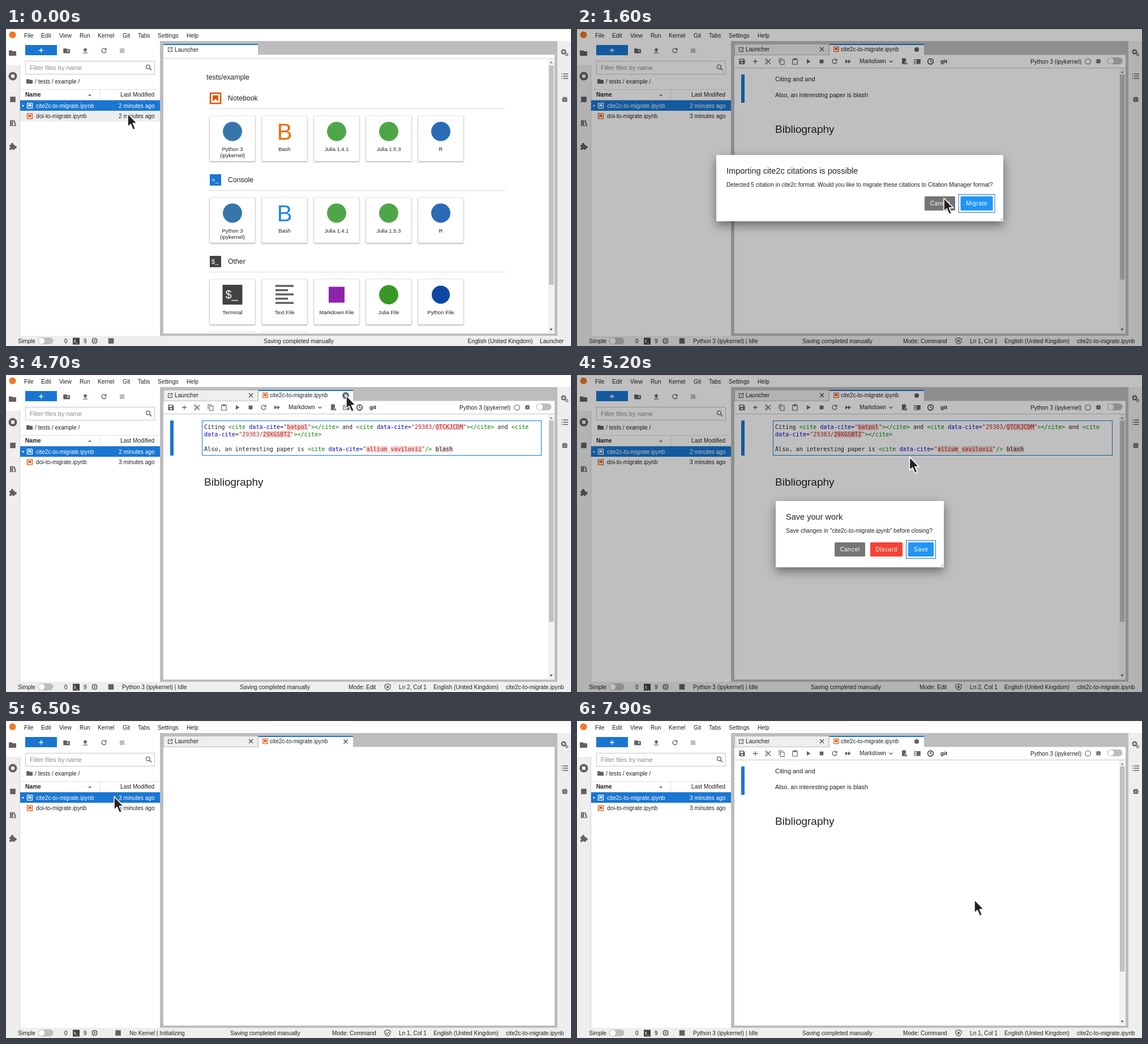
Write an HTML page that moves like this. It is 998 px wide and 561 px high and loops after 8 s.

```html
<!DOCTYPE html>
<html lang="en">
<head>
<meta charset="utf-8">
<title>Citation import</title>
<style>
html, body { margin: 0; width: 100%; height: 100%; overflow: hidden; background: #fff; }
svg { display: block; width: 998px; height: 561px; }
text { font-family: "Liberation Sans", Arial, sans-serif; white-space: pre; }
.code { font-family: "DejaVu Sans Mono", monospace; }
.tip { font-family: "Noto Sans", "Open Sans", sans-serif; }
.card { filter: drop-shadow(0 1px 1px rgba(0,0,0,.38)); }
.dialog { filter: drop-shadow(0 7px 9px rgba(0,0,0,.45)); }
</style>
</head>
<body>
<svg id="stage" viewBox="0 0 998 561"></svg>
<script>
const BLUE = '#1976d2', GREY = '#616161', INK = '#212121', ORANGE = '#e65100';

const text = (x, y, s, size = 10.15, fill = INK, more = '') =>
  `<text x="${x}" y="${y}" font-size="${size}" fill="${fill}" ${more}>${s}</text>`;
const rect = (x, y, w, h, fill, more = '') =>
  `<rect x="${x}" y="${y}" width="${w}" height="${h}" fill="${fill}" ${more}/>`;
const disc = (x, y, r, fill, more = '') =>
  `<circle cx="${x}" cy="${y}" r="${r}" fill="${fill}" ${more}/>`;
const shape = (d, fill = GREY) => `<path d="${d}" fill="${fill}"/>`;
const line = (d, color = GREY, w = 1.3) =>
  `<path d="${d}" fill="none" stroke="${color}" stroke-width="${w}"/>`;
const at = (x, y, body, scale = 1) =>
  `<g transform="translate(${x} ${y}) scale(${scale})">${body}</g>`;
const group = (id, body) => `<g id="${id}">${body}</g>`;

// Icons are drawn around their own centre.
const folder = shape('M-6-4.5h4.5l1.5 1.5h5q1 0 1 1v6q0 1-1 1h-11q-1 0-1-1v-7.5q0-1 1-1z');
const bookmark = (c, s) => rect(-s, -s, 2 * s, 2 * s, 'none', `stroke="${c}" stroke-width="${s * .28}"`) +
  shape(`M${-s * .55} ${-s * .58}h${s * 1.1}v${s * 1.2}l${-s * .55} ${-s * .5}l${-s * .55} ${s * .5}z`, c);
const prompt = (s, fill, mark = '$_') => rect(-s, -s, 2 * s, 2 * s, fill) +
  text(-s * .72, s * .38, mark, s * 1.15, '#fff');
const cross = line('M-3.5-3.5l7 7m0-7l-7 7', '#424242', 1.1);
const reload = line('M3.2-2.7a4 4 0 1 0 .8 3.3') + shape('M4.5-5v4.2h-4.2z');
const plus = c => line('M-4 0h8m-4-4v8', c);
const popout = line('M0-3.5h-3.5v7h7v-3.5M-.5.5l4-4M1-3.7h2.7v2.7', '#424242', 1);
const bug = disc(0, 0, 4, GREY) + line('M-5-3h10M-5.3 0h10.6M-5 3h10M-2.5-5.5l1.5 2m3.5-2l-1.5 2', GREY, 1.2) +
  line('M-1.5-.9h3m-3 2h3', '#eee', .9);
const gear = disc(0, 0, 3, 'none', `stroke="${GREY}" stroke-width="1.8"`) +
  disc(0, 0, 4.3, 'none', `stroke="${GREY}" stroke-width="1.2" stroke-dasharray="1.7 1.67"`);
const chip = rect(-3.5, -3.5, 7, 7, 'none', `stroke="${GREY}" stroke-width="1.4"`) + rect(-1.3, -1.3, 2.6, 2.6, GREY) +
  line('M-1.5-5.5v2m3-2v2m-3 7v2m3-2v2M-5.5-1.5h2m-2 3h2m7-3h2m-2 3h2', GREY, 1);
const square = c => rect(-4.8, -4.8, 9.6, 9.6, c);
const toggle = (x, y) => rect(x, y - 6, 27, 12, '#bdbdbd', 'rx="6"') + disc(x + 6.5, y, 5.2, '#fff');
const shield = mark => line('M0-5.5l5 2v3.5q-.8 4-5 5.5q-4.2-1.5-5-5.5v-3.5z', '#424242', 1.1) + line(mark, '#424242', 1.1);

function menus() {
  const items = [[32, 'File'], [62, 'Edit'], [94, 'View'], [130, 'Run'], [162, 'Kernel'],
    [206, 'Git'], [233, 'Tabs'], [268, 'Settings'], [319, 'Help']];
  return rect(0, 0, 998, 23, '#fff') + rect(0, 0, 998, 1.5, '#111') + disc(11.5, 12, 6, '#f37726') +
    items.map(([x, s]) => text(x, 16.6, s)).join('');
}

function sidebars() {
  const books = rect(-5, -4.5, 2.3, 9, GREY) + rect(-2, -4.5, 2.3, 9, GREY) + shape('M1-4l2-.6 3 8.6-2 .7z') + rect(-6, 4.6, 12, 1.2, GREY);
  const puzzle = rect(-6, -3, 9.5, 9, GREY, 'rx="1"') + disc(-1, -4, 2.3, GREY) + disc(4.5, 1.4, 2.3, GREY) +
    disc(-6, 1.4, 1.5, '#eee') + disc(-1, 6, 1.5, '#eee');
  const list = line('M-3-4h9M-3 0h9M-3 4h9M-6-4h1.6M-6 0h1.6M-6 4h1.6');
  return rect(0, 23, 25, 520, '#eee') + rect(974, 23, 24, 520, '#eee') + rect(0, 23, 25, 42, '#fff') +
    line('M24.5 65V543', '#d0d0d0', 1) +
    at(12, 44, folder) + at(12, 85, disc(0, 0, 7.5, GREY) + rect(-3, -3, 6, 6, '#eee', 'rx="1"')) +
    at(12, 126, square(GREY)) + at(12, 167, books) + at(12, 209, puzzle) +
    at(985, 42, gear) + at(990.5, 47, gear, .6) + at(987, 85, list) + at(987, 126.5, bug);
}

function files() {
  return rect(25, 23, 247, 520, '#fff') + rect(34, 30, 56, 18, BLUE) + at(62, 39.5, plus('#fff')) +
    at(107.5, 40, folder + line('M2-1.5v4m-2-2h4', '#fff', 1), .9) +
    at(140, 40, shape('M0-5l4 4h-2.3v3h-3.4v-3h-2.3zM-4 3.5h8v1.3h-8z')) +
    at(173, 40, reload) + at(205, 40, square('#bdbdbd'), .85) +
    rect(34.5, 58.5, 228, 23, '#fff', 'stroke="#c6c6c6"') + text(42, 74, 'Filter files by name', 10.95, '#8a8a8a') +
    at(252, 69.5, disc(-1, -1, 3.4, 'none', `stroke="${GREY}" stroke-width="1.4"`) + line('M1.5 1.5l3.5 3.5', GREY, 1.6)) +
    at(42, 94, folder, .85) + text(51, 97.6, '/ tests / example /') +
    line('M25 108.5H272M25 127.5H272M165.5 108V127', '#e0e0e0', 1) +
    text(34, 121, 'Name', 10.15, INK, 'font-weight="700"') + shape('M145 119.5l3-3 3 3z') + text(202, 121, 'Last Modified') +
    `<rect id="hover" x="25" y="146" width="247" height="19" fill="#eee"/>` +
    rect(25, 127.5, 247, 18.5, BLUE) + disc(30, 137, 1.5, '#fff') + at(42, 137, bookmark('#fff', 4.5)) +
    text(53, 140.5, 'cite2c-to-migrate.ipynb', 10.15, '#fff') + text(199, 140.5, '', 10.15, '#fff', 'id="age1"') +
    at(42, 155.5, bookmark(ORANGE, 4.5)) + text(53, 159, 'doi-to-migrate.ipynb') + text(199, 159, '', 10.15, INK, 'id="age2"');
}

function scrollbar(top, id) {
  return rect(958, top, 10.5, 538 - top, '#f1f1f1') + shape(`M960.5 ${top + 8}l2.5-3 2.5 3z`, '#777') +
    shape('M960.5 530.5l2.5 3 2.5-3z', '#333') +
    `<rect id="${id}" x="959" y="${top + 12}" width="8.5" height="${453 - top - 12}" fill="#c1c1c1"/>`;
}

function launcher() {
  const julia = disc(0, 0, 17, '#4fa648'), python = disc(0, 0, 17, '#3776ab'), ar = disc(0, 0, 17, '#2a6bb8');
  const letter = c => text(0, 14, 'B', 40, c, 'text-anchor="middle"');
  const kernels = c => [['Python 3', python, '(ipykernel)'], ['Bash', letter(c)], ['Julia 1.4.1', julia], ['Julia 1.5.3', julia], ['R', ar]];
  const lines = line('M-16-15.5h32M-16-8h22M-16-.5h32M-16 7h22M-16 14.5h32', '#616161', 3.4);
  const other = [['Terminal', prompt(17.5, '#424242')], ['Text File', lines],
    ['Markdown File', rect(-14, -14, 28, 28, '#8e24aa')], ['Julia File', disc(0, 0, 17, '#389826')],
    ['Python File', disc(0, 0, 16, '#0d47a1')]];
  const card = (x, y) => rect(x, y, 80, 80, '#fff', 'class="card" stroke="#dedede" stroke-width=".6" rx="1"');
  const label = (x, y, s) => text(x, y, s, 9.4, INK, 'text-anchor="middle"');
  const section = (y, title, icon, cards) => at(370, y, icon) + text(392, y + 4.3, title, 12.3) +
    line(`M358 ${y + 18.5}H882`, '#dcdcdc', 1) +
    cards.map(([name, art, second], i) => {
      const x = 360 + 92 * i;
      return card(x, y + 31) + at(x + 40, y + 58.5, art) + label(x + 40, y + 93.3, name) +
        (second ? label(x + 40, y + 104, second) : '');
    }).join('');
  return rect(278, 28, 167, 20, '#fff') + rect(278, 28, 167, 2, BLUE) + rect(278, 47, 691, 492, '#fff') +
    line('M278 53.5H969', '#d5d5d5', 1) + at(290, 38, popout) + text(298, 41.5, 'Launcher') +
    text(354, 90.5, 'tests/example', 12.3) +
    section(124, 'Notebook', bookmark(ORANGE, 9), kernels('#ef6c00')) +
    section(268, 'Console', prompt(10, BLUE, '&gt;_'), kernels('#1e88e5')) +
    section(412, 'Other', prompt(10, '#424242'), other) +
    `<clipPath id="fold"><rect x="278" y="530" width="680" height="8.5"/></clipPath><g clip-path="url(#fold)">${card(360, 535.5)}${card(452, 535.5)}</g>` +
    `<rect id="cardHover" x="542" y="380" width="84" height="3" fill="#000" opacity=".14"/>` + scrollbar(54, 'thumbL');
}

function toolbar() {
  const save = shape('M-5-5h7.5l2.5 2.5v7.5h-10z') + rect(-3.3, -3.6, 5.3, 2.6, '#fff') + disc(0, 2.2, 1.6, '#fff');
  const cut = line('M-5-4L4 4M-5 4L4-4', GREY, 1.4) + disc(-3.6, -3.2, 1.6, '#fff', `stroke="${GREY}"`) + disc(-3.6, 3.2, 1.6, '#fff', `stroke="${GREY}"`);
  const copy = line('M-4.5 3v-8h6.5M-2-2.5h6.5v8h-6.5z', GREY, 1.1);
  const paste = line('M-4.2-4h8.4v9h-8.4z', GREY, 1.2) + rect(-2.5, -5.5, 5, 3, GREY);
  const add = shape('M-4-5.5h7v6h-2v5l-2-1.5-3 1.5z') + line('M3 1v5M.5 3.5h5', GREY, 1.3);
  const book = line('M-5.2-3.5h4.6v7.5h-4.6zM.6-3.5h4.6v7.5h-4.6z', GREY, 1.1) + rect(1, -3, 4, 6.5, GREY) + line('M-4-1h2.4m-2.4 2h2.4', GREY, .9);
  const clock = disc(0, 0, 4.8, 'none', 'stroke="#212121" stroke-width="1.4"') + line('M0-3v3l2.3 1.5', INK, 1.1);
  const icons = [[291.5, save], [315, plus(GREY)], [338, cut], [361.5, copy], [385, paste], [409, shape('M-3-4l6.5 4-6.5 4z')],
    [432, rect(-3.3, -3.3, 6.6, 6.6, GREY)], [455, reload], [479, shape('M-5-3.5l5 3.5-5 3.5zM0-3.5l5 3.5-5 3.5z')],
    [554.5, line('M-3-1.5l3 3 3-3')], [578, add], [601, book], [624.5, clock],
    [902.5, disc(0, 0, 4.8, 'none', `stroke="${GREY}" stroke-width="1.1"`)], [921, at(0, 0, bug, .85)]];
  return icons.map(([x, body]) => at(x, 59, body)).join('') + text(499, 62, 'Markdown') +
    text(642, 61.6, 'git', 9.8, INK, 'font-weight="700"') + text(801, 62.5, 'Python 3 (ipykernel)') + toggle(936.5, 58) +
    line('M278 70.5H969', '#c4c4c4', 1);
}

// Source lines use marks: g tag, b attribute, r string, h flagged string, k flagged plain word.
const CHAR = 6.11;
function codeLine(y, parts) {
  const color = { g: '#008000', b: '#0000cc', r: '#ba2121', h: '#ba2121', k: INK, '': INK };
  let col = 0, back = '', spans = '';
  for (const [kind, s] of parts) {
    const n = s.length;
    if (kind === 'h' || kind === 'k') back += rect(350 + col * CHAR, y - 9, n * CHAR, 11.5, kind === 'h' ? '#f9d5d5' : '#f3dede');
    spans += `<tspan fill="${color[kind]}">${s.replace(/</g, '&lt;').replace(/>/g, '&gt;')}</tspan>`;
    col += n;
  }
  return back + `<text class="code" xml:space="preserve" x="350" y="${y}" font-size="10.15">${spans}</text>`;
}

function notebook() {
  const open = [['g', '<cite '], ['b', 'data-cite'], ['', '=']], close = ['g', '></cite>'], q = ['r', '"'];
  const edit = rect(346.5, 82.5, 599, 61, '#fff', `stroke="${BLUE}"`) +
    codeLine(96.8, [['', 'Citing '], ...open, q, ['h', 'batpol'], q, close, ['', ' and '], ...open, ['r', '"29383/'], ['h', 'QTCKJCDM'], q, close, ['', ' and '], ['g', '<cite']]) +
    codeLine(109.8, [['b', 'data-cite'], ['', '='], ['r', '"29383/'], ['h', '29XGSBTZ'], q, close]) +
    codeLine(136, [['', 'Also, an interesting paper is '], ...open, q, ['h', 'allium'], ['r', '_'], ['h', 'vavilovii'], q, ['g', '/>'], ['', ' '], ['k', 'blash']]) +
    group('caret', rect(350, 114, 1, 12, '#000'));
  return rect(278.5, 28.5, 166.5, 19, '#eee', 'stroke="#bdbdbd"') + rect(446, 28, 167, 20, '#fff') + rect(446, 28, 167, 2, BLUE) +
    rect(278, 47.5, 691, 491.5, '#fff') + line('M278 47.5H446', '#bdbdbd', 1) +
    at(290, 38, popout) + text(298, 41, 'Launcher') + at(432.5, 37.5, cross) +
    at(458, 37.5, bookmark(ORANGE, 4.2)) + text(466, 41, 'cite2c-to-migrate.ipynb') +
    at(600, 38, group('tabClose', cross) + group('tabDot', disc(0, 0, 4, GREY)) +
      group('tabHover', disc(0, 0, 6, GREY) + line('M-2.5-2.5l5 5m0-5l-5 5', '#fff', 1.1))) +
    group('content', toolbar() + scrollbar(71, 'thumbN') +
      `<rect id="cellBar" x="290" y="82" width="6" width="6" fill="${BLUE}" rx="1"/>`.replace(' width="6" width', ' width') +
      group('rendered', text(350, 94, 'Citing and and', 10.95) + text(350, 122, 'Also, an interesting paper is blash', 10.95)) +
      group('editor', edit) + text(350, 185, 'Bibliography', 19, INK, 'id="heading"'));
}

function statusbar() {
  return rect(0, 543, 998, 18, '#eee') + text(21, 556, 'Simple') + toggle(56.5, 552) + text(103, 556, '0') +
    at(124, 552.5, prompt(6, '#424242')) + text(137, 556, '9') + at(156.5, 552, chip) +
    `<g id="git">${square(GREY)}</g>` + text(0, 556, '', 10.15, INK, 'id="kernel"') +
    text(0, 556, 'Saving completed manually', 10.15, INK, 'id="saved"') +
    group('docStatus', text(0, 556, '', 10.15, INK, 'id="mode"') +
      at(674, 552, group('trustNo', shield('M-2-2l4 4m0-4l-4 4'))) + at(674, 552, group('trustYes', shield('M-2.5 0l2 2 3.2-3.6'))) +
      text(694, 556, '', 10.15, INK, 'id="pos"') + text(755, 556, 'English (United Kingdom)') + text(883, 556, 'cite2c-to-migrate.ipynb')) +
    group('homeStatus', text(815.5, 556, 'English (United Kingdom)') + text(943, 556, 'Launcher')) +
    group('waiting', rect(0, 545, 330, 16, '#000') + text(3, 557, 'Waiting for localhost…', 11.8, '#fff', 'class="tip"'));
}

function dialog(x, w, title, body, buttons) {
  return rect(x, 224, w, 117, '#fff', 'class="dialog"') + text(x + 18, 256.5, title, 14.55) + text(x + 18, 279.5, body) +
    buttons.map(([bx, bw, s, fill, id = '']) => rect(bx, 297, bw, 25, fill, `rx="1.5" id="${id}"`) +
      text(bx + bw / 2 + .3, 313, s, 10.15, '#fff', 'text-anchor="middle" letter-spacing=".62"')).join('') +
    line(`M${x + w - 6} 340l5-5m-2.5 5l2.5-2.5`, '#777', .8);
}

function overlays() {
  const focus = (x, w) => rect(x, 293.5, w, 32, 'none', `stroke="${BLUE}"`);
  return group('dim', rect(0, 1, 998, 560, '#000', 'opacity=".25"')) +
    group('importBox', dialog(246, 507, 'Importing cite2c citations is possible',
      'Detected 5 citation in cite2c format. Would you like to migrate these citations to Citation Manager format?',
      [[614, 54, 'Cancel', '#757575'], [677.5, 57, 'Migrate', '#2196f3', 'migrate']]) + focus(674, 64)) +
    group('closeBox', dialog(351, 297, 'Save your work', 'Save changes in "cite2c-to-migrate.ipynb" before closing?',
      [[455, 54, 'Cancel', '#757575'], [518, 57, 'Discard', '#f44336'], [585, 45, 'Save', '#2196f3']]) + focus(581.5, 52));
}

function pointers() {
  const edge = 'stroke="#fff" stroke-width="1.6" stroke-linejoin="round"';
  const arrow = `<path d="M0 0V23.5l5.2-4.8 4.2 9.8 4.2-1.8-4.2-9.6h7.3z" fill="#222" ${edge}/>`;
  const beam = line('M-4-8.5q4 0 4 2.5q0-2.5 4-2.5M0-6.5v13M-4 8.5q4 0 4-2.5q0 2.5 4 2.5', '#fff', 3) +
    line('M-4-8.5q4 0 4 2.5q0-2.5 4-2.5M0-6.5v13M-4 8.5q4 0 4-2.5q0 2.5 4 2.5', '#222', 1.4);
  const hand = `<path d="M-2.5 0q2-2.6 4.2 0l2.8 7 2.4-1.2 2.2 1.2 2.2-1 2 1.6q2 .2 2 2l.3 6q-1 4.5-2.6 8l-11 1.2q-3-4.5-7.5-7.5-4-2.6-2.8-4.2 2.2-1.8 6.2 1.2z" fill="#fff" stroke="#222" stroke-width="1.5" stroke-linejoin="round"/>` +
    line('M5 8.5l1.3 4.5M9.2 8l1 4.3M13 8.5l.5 3.8', '#222', 1.1);
  return `<g id="pointer">${group('arrow', arrow)}${group('beam', beam)}${group('hand', hand)}</g>`;
}

document.getElementById('stage').innerHTML = rect(0, 0, 998, 561, '#bdbdbd') + menus() + sidebars() + files() +
  group('launcher', launcher()) + group('notebook', notebook()) + statusbar() + overlays() + pointers();

const el = {};
document.querySelectorAll('[id]').forEach(n => { if (n.id) el[n.id] = n; });
const show = (id, on) => { el[id].style.display = on ? '' : 'none'; };
const set = (id, attrs) => { for (const k in attrs) el[id].setAttribute(k, attrs[k]); };
const write = (id, s) => { if (el[id].textContent !== s) el[id].textContent = s; };

const LOOP = 8000;
const PATH = [[0, 215, 151], [100, 195, 152], [200, 172, 151], [300, 180, 141], [400, 191, 135], [1100, 191, 135],
  [1500, 636, 292], [1600, 648, 300], [1700, 648, 300], [1800, 646, 301], [2200, 646, 301], [2400, 500, 230],
  [2600, 336, 192], [2700, 345, 152], [2800, 420, 126], [3000, 603, 112], [3800, 603, 112], [4100, 878, 104],
  [4300, 860, 104], [4700, 601, 38], [5000, 601, 38], [5500, 567, 309], [5600, 567, 309], [6300, 191, 135],
  [6600, 191, 135], [6800, 264, 167], [7200, 690, 320], [7400, 702, 317], [LOOP, 702, 317]];

function pointerAt(t) {
  const i = PATH.findIndex(p => p[0] > t), [t0, x0, y0] = PATH[i - 1], [t1, x1, y1] = PATH[i];
  const k = (t - t0) / (t1 - t0);
  return [x0 + (x1 - x0) * k, y0 + (y1 - y0) * k];
}

function draw(t) {
  const within = (a, b) => t >= a && t < b;
  const home = t < 800 || within(5500, 6400);
  const loading = within(800, 1000) || within(6400, 6600);
  const edit = within(3400, 5500);
  const importing = within(1100, 2000) || within(6700, 7900);
  const closing = within(4900, 5500);
  const [x, y] = pointerAt(t);

  show('launcher', home);
  show('notebook', !home);
  show('content', !loading);
  show('rendered', !edit);
  show('editor', edit);
  show('caret', t < 3900);
  show('tabClose', loading);
  show('tabHover', within(4700, 4900));
  show('tabDot', !loading && !within(4700, 4900));
  set('cellBar', { height: edit ? 62 : 50 });
  set('heading', { y: edit ? 196.5 : 185 });
  set('thumbN', { y: 82, height: edit ? 355 : 362 });

  show('hover', t < 800 && y > 146);
  write('age1', (t < 6400 ? 2 : 3) + ' minutes ago');
  write('age2', (t < 800 ? 2 : 3) + ' minutes ago');

  show('docStatus', !home);
  show('homeStatus', home);
  show('trustYes', loading);
  show('trustNo', !loading);
  show('waiting', within(5500, 6400));
  set('git', { transform: `translate(${loading ? 198 : 185.5} 552)` });
  set('kernel', { x: loading ? 218 : 205 });
  write('kernel', home ? '' : loading ? 'No Kernel | Initializing' : 'Python 3 (ipykernel) | Idle');
  set('saved', { x: home ? 455 : loading ? 396 : edit ? 413 : 398 });
  set('mode', { x: edit ? 605 : 576 });
  write('mode', edit ? 'Mode: Edit' : 'Mode: Command');
  write('pos', edit ? 'Ln 2, Col 1' : 'Ln 1, Col 1');

  show('dim', importing || closing);
  show('importBox', importing);
  show('closeBox', closing);
  set('migrate', { fill: t >= 7700 ? BLUE : '#2196f3' });

  const hand = within(5500, 5700), beam = edit && !closing && y > 82;
  show('cardHover', hand);
  show('hand', hand);
  show('beam', beam);
  show('arrow', !hand && !beam);
  set('pointer', { transform: `translate(${x.toFixed(1)} ${y.toFixed(1)})` });
}

const start = performance.now();
function tick(now) {
  const t = Math.max(0, now - start) % LOOP;
  draw(Math.floor(t / 100) * 100);
  requestAnimationFrame(tick);
}
draw(0);
requestAnimationFrame(tick);
</script>
</body>
</html>
```
